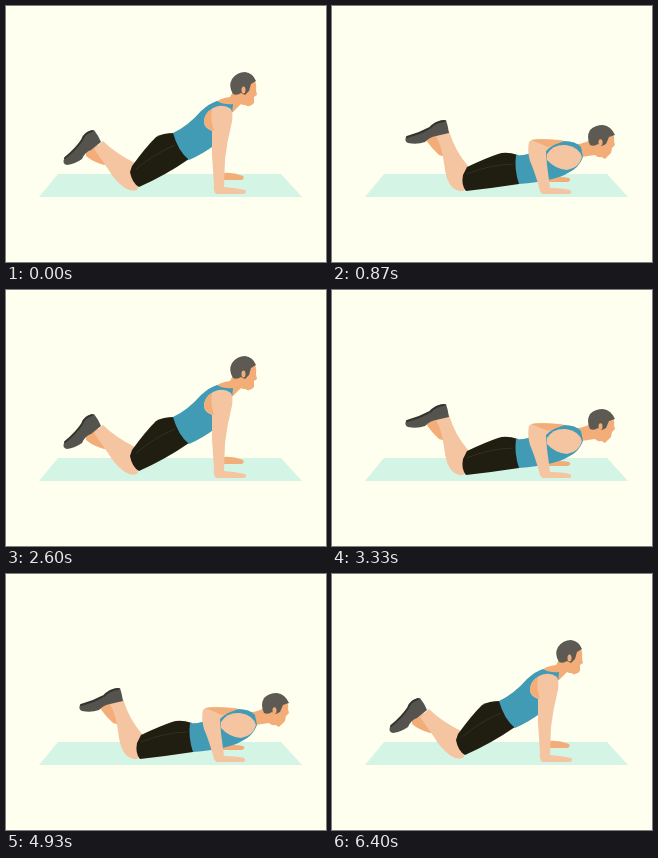
Write an HTML page that moves like this. It is 320 px wide and 256 px high and loops after 6470 ms.

```html
<!DOCTYPE html>
<html lang="en">
<head>
<meta charset="utf-8">
<title>Knee push-ups</title>
<style>
  html, body { margin: 0; width: 100%; height: 100%; overflow: hidden; background: #fffff0; }
  svg { display: block; width: 100vw; height: 100vh; }
  .mat { fill: #d4f4e6; }
  .skin { fill: #f5c4a0; }
  .shade { fill: #f3ad78; }
  .top { fill: #429bb5; }
  .shorts { fill: #201d11; }
  .fold { fill: none; stroke: #343020; stroke-width: 1; }
  .hair { fill: #5d5a53; }
  .shoe { fill: #55534d; }
  .sole { fill: none; stroke: #34332d; stroke-width: 2; stroke-linecap: round; }

  /* three push-ups per 6470 ms, starting halfway through a raised hold */
  .up, .down { animation: raised 2156.667ms step-end infinite; }
  .down { animation-name: lowered; }
  @keyframes raised { 0%, 75%, 100% { visibility: visible; } 25% { visibility: hidden; } }
  @keyframes lowered { 0%, 75%, 100% { visibility: hidden; } 25% { visibility: visible; } }
</style>
</head>
<body>
<svg viewBox="0 0 320 256">
  <path class="mat" d="M52 168H275L296 191H33Z"/>

  <g class="up">
    <path class="shade" d="M217 167Q227 166 237 170Q239 173 235 174H217Z"/>
    <path class="shade" d="M80 146L92 139L108 157L98 159Q87 156 80 150Z"/>
    <path class="skin" d="M88 143L97 135Q109 147 129 157L132 183Q127 187 119 182Q109 175 102 163Z"/>
    <path class="shoe" d="M76 134Q79 125 88 124Q92 129 95 136L85 144Q79 146 76 153Q69 158 61 159Q56 158 58 153Q69 144 76 134Z"/>
    <path class="sole" d="M59 152Q70 143 76 134Q78 127 86 125"/>
    <path class="shorts" d="M126 160Q139 142 150 131Q157 127 168 127L183 153Q160 169 133 181Q126 177 124 166Z"/>
    <path class="fold" d="M130 163Q148 148 169 139"/>
    <path class="shade" d="M207 98Q214 92 224 91L229 82L246 88L244 98Q237 100 235 98L227 106L210 107Z"/>
    <path class="top" d="M167 127Q182 120 195 105Q204 97 211 95Q218 99 227 98L226 108L210 138Q197 148 183 154Q172 145 167 127Z"/>
    <path class="skin" d="M198 116Q198 107 207 102Q217 97 225 103Q228 109 225 120Q221 136 219 153L218 181Q230 182 239 184Q242 187 237 188H210Q207 185 208 179L206 149V125Q198 122 198 116Z"/>
    <path class="shade" d="M198 116Q198 108 206 103Q204 113 208 125Q199 122 198 116Z"/>
    <path class="shade" d="M233 79L248 73Q251 78 250 84L251 89L248 91L248 97Q245 101 241 100Q234 97 231 89Z"/>
    <path class="hair" d="M227 88Q222 80 226 73Q231 66 239 66Q247 67 250 75L245 78L243 85L239 89L235 87Q231 90 227 88Z"/>
    <ellipse class="shade" cx="237.5" cy="84" rx="2" ry="3.5"/>
  </g>

  <g class="down">
    <path class="shade" d="M216 172Q228 170 237 172Q240 174 236 176H215Z"/>
    <path class="shade" d="M94 134L106 128L114 151L107 149Q100 143 94 134Z"/>
    <path class="skin" d="M104 130L117 125Q123 145 136 160L133 184Q128 187 121 182Q114 176 112 157Q110 141 104 130Z"/>
    <path class="shoe" d="M98 123Q103 114 114 114Q116 120 117 127L104 130Q98 131 93 136Q85 139 76 137Q72 135 74 131Q85 128 98 123Z"/>
    <path class="sole" d="M75 131Q87 128 98 122Q103 116 112 115"/>
    <path class="shorts" d="M135 161Q154 152 166 148Q174 145 186 149Q190 164 187 178Q161 182 134 185Q129 179 131 169Z"/>
    <path class="fold" d="M135 168Q156 159 181 158"/>
    <path class="shade" d="M238 138Q247 139 254 136L263 132L276 139L272 150Q267 153 263 149L249 151Z"/>
    <path class="top" d="M184 149Q194 150 204 145Q216 137 232 135Q244 135 249 141L251 151Q247 162 236 167Q223 175 187 178Q182 163 184 149Z"/>
    <path class="skin" d="M215 148Q221 138 234 139Q247 141 250 151Q247 162 235 164Q223 163 215 154Z"/>
    <path class="skin" d="M197 136Q199 133 207 133L232 134Q221 138 214 145L215 159L218 182Q230 182 238 184Q241 187 237 188H211Q208 187 207 181Q202 164 198 155Q195 144 197 136Z"/>
    <path class="shade" d="M199 134Q215 132 232 135Q222 139 216 141Q207 137 199 134Z"/>
    <path class="shade" d="M264 133L280 127Q283 131 282 135L283 139L280 142L279 147Q276 150 273 153Q268 151 263 141Z"/>
    <path class="hair" d="M258 139Q254 131 258 124Q263 119 271 119Q279 120 283 129L277 131L274 138L270 140L266 138Q262 141 258 139Z"/>
    <ellipse class="shade" cx="268.5" cy="136.5" rx="2" ry="3.3"/>
  </g>
</svg>
</body>
</html>
```
